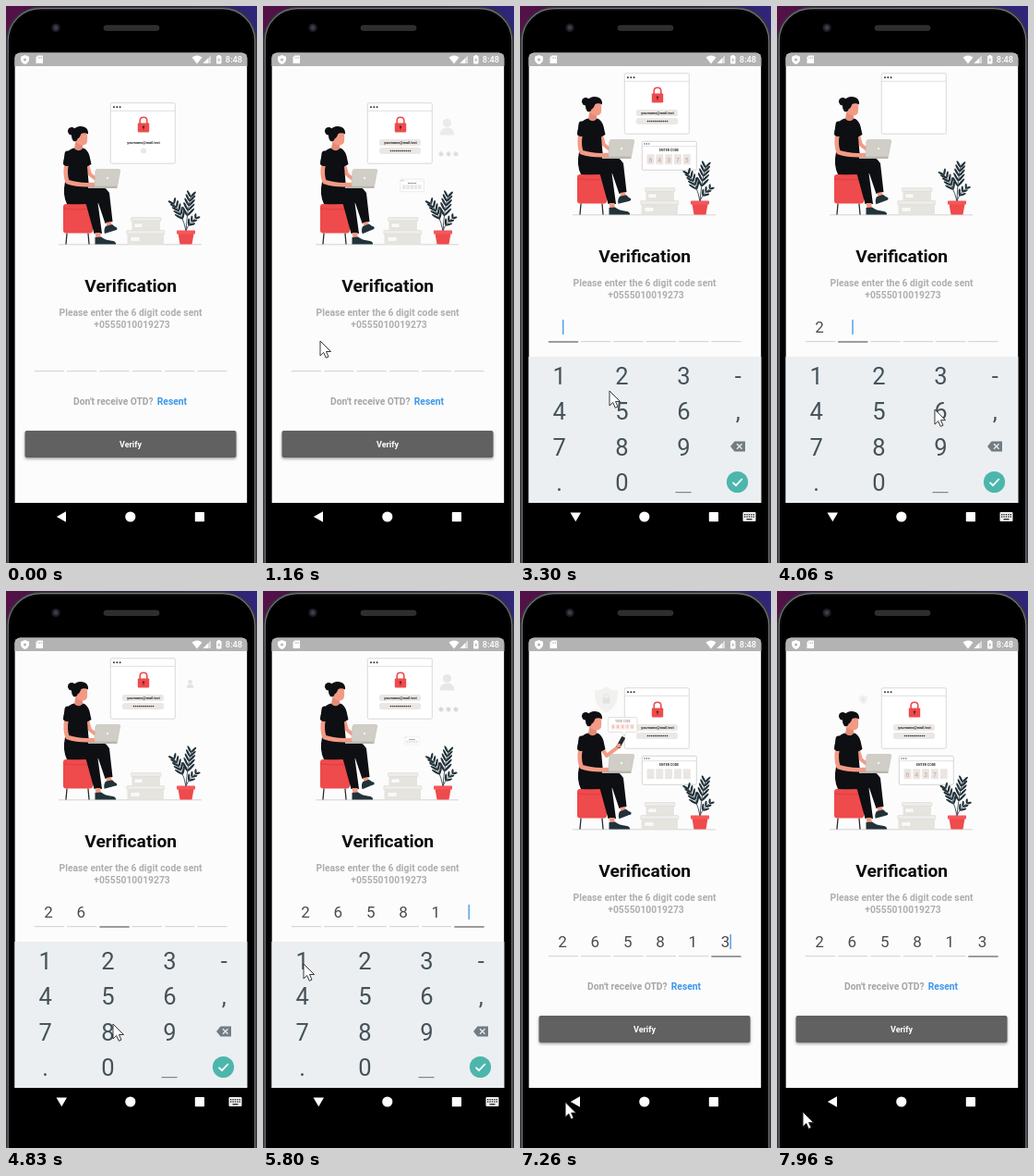
An HTML page with a canvas for the animation above (8000 ms loop, 272 by 602 pixels).

```html
<!DOCTYPE html>
<html lang="en">
<head>
<meta charset="utf-8">
<title>Verification screen</title>
<style>
html, body { margin: 0; width: 100%; height: 100%; overflow: hidden; background: #000; }
canvas { display: block; width: 272px; height: 602px; }
</style>
</head>
<body>
<canvas id="stage"></canvas>
<script>
const W = 272, H = 602, LOOP = 8000, STORY = 4720;
const SCREEN = [9.4, 50.4, 252, 486.6];
const canvas = document.getElementById('stage');
const c = canvas.getContext('2d');
const dpr = window.devicePixelRatio || 1;
canvas.width = W * dpr;
canvas.height = H * dpr;

const RED = '#ef4a4c', SKIN = '#f39a85', INK = '#0d0f12', LEAF = '#22323a';
const clamp = v => Math.max(0, Math.min(1, v));
const ramp = (t, a, b) => clamp((t - a) / (b - a));
const ease = v => v * v * (3 - 2 * v);
const back = v => 1 + 2.2 * (v - 1) ** 3 + 1.2 * (v - 1) ** 2;
const pop = (t, a, b) => t <= a ? 0 : t >= b ? 1 : Math.max(0, back(ramp(t, a, b)));

// Typed digits and the moment each lands in its field
const CODE = '265813';
const TYPED = [3600, 4250, 5050, 5400, 5800, 6200];

// Pointer tip: time, x, y
const POINTER = [
  [640, -14, 400], [1160, 62, 362], [1500, 46, 384], [1750, 44, 385], [2200, -14, 481],
  [2735, -14, 450], [3000, 62, 432], [3300, 97, 416], [3550, 109, 402], [3700, 109, 402],
  [4150, 178, 440], [4350, 176, 442], [4830, 116, 468], [5020, 112, 442], [5150, 112, 443],
  [5350, 112, 476], [5460, 110, 476], [5750, 44, 403], [5860, 44, 403], [6150, 177, 402],
  [6260, 177, 403], [6620, 58, 548], [6760, 55, 549], [7150, 52, 551], [7650, 29, 563], [8000, 28, 563]
];

function box(x, y, w, h, r, fill, stroke, lw = 0.6) {
  c.beginPath();
  c.roundRect(x, y, w, h, r);
  if (fill) { c.fillStyle = fill; c.fill(); }
  if (stroke) { c.strokeStyle = stroke; c.lineWidth = lw; c.stroke(); }
}
function dot(x, y, r, fill) {
  c.beginPath();
  c.arc(x, y, r, 0, 7);
  c.fillStyle = fill;
  c.fill();
}
function shape(d, fill, stroke, lw = 1) {
  const p = new Path2D(d);
  if (fill) { c.fillStyle = fill; c.fill(p); }
  if (stroke) { c.strokeStyle = stroke; c.lineWidth = lw; c.stroke(p); }
}
function label(s, x, y, size, color, weight = 400, align = 'center') {
  c.font = `${weight} ${size}px Roboto, sans-serif`;
  c.textAlign = align;
  c.fillStyle = color;
  c.fillText(s, x, y);
}
function scaled(x, y, k, alpha, draw) {
  if (k <= 0.01 || alpha <= 0.01) return;
  c.save();
  c.globalAlpha *= alpha;
  c.translate(x, y);
  c.scale(k, k);
  c.translate(-x, -y);
  draw();
  c.restore();
}

function storyTime(t) {
  if (t < 100) return 0;
  if (t < 630) return 200;
  if (t >= 2260 && t < 2730) return 2260;
  return t % STORY;
}

function body() {
  const bg = c.createLinearGradient(0, 0, W, 0);
  bg.addColorStop(0, '#551148');
  bg.addColorStop(0.5, '#24164a');
  bg.addColorStop(1, '#30267a');
  c.fillStyle = bg;
  c.fillRect(0, 0, W, H);
  box(0.3, 1, 271.4, 660, 37, '#2c2d30', '#3a3b3e', 0.8);
  box(2.2, 2.6, 267.6, 660, 35, '#0a0a0b', '#77797d', 1.2);
  box(4.6, 5, 262.8, 660, 32, '#000');
  dot(54, 23.5, 4.6, '#1e1e24');
  dot(54, 23.5, 2.4, '#3b3d4a');
  box(106, 21, 60, 5.5, 2.7, '#2e2e31', '#3d3d40', 0.6);
}

function statusBar() {
  c.fillStyle = '#b3b3b3';
  c.fillRect(9, 50, 253, 15);
  shape('M20.5 53 L25 54.7 V58 Q24.5 61.5 20.5 63 Q16.5 61.5 16 58 V54.7Z', '#fff');
  dot(20.5, 58, 1.5, '#b3b3b3');
  shape('M34.5 53.5 H40 V62 H32.5 V55.5Z', '#fff');
  shape('M35 55 V57 M36.8 55 V57 M38.5 55 V57', null, '#b3b3b3', 0.7);
  shape('M201.5 55.5 Q207 51.5 212.5 55.5 L207 62.5Z', '#fff');
  shape('M222 53.5 V62 H213.5Z', '#dedede');
  shape('M219 56.5 V62 H213.5Z', '#fff');
  box(228, 54, 5.5, 8.5, 0.8, '#fff');
  c.fillRect(229.5, 53, 2.5, 1.5);
  shape('M231.3 55.5 L229.3 58.8 H230.6 L230.2 61 L232.3 57.8 H231Z', '#b3b3b3');
  label('8:48', 247, 61.3, 9.3, '#fff', 500);
}

function lock() {
  shape('M145.2 127.5 V123.8 Q145.2 120.3 149 120.3 Q152.8 120.3 152.8 123.8 V127.5', null, RED, 1.6);
  box(142.8, 126.6, 12.4, 9.8, 1, RED);
  dot(149, 130.6, 1.2, '#5c2024');
  c.fillRect(148.6, 131, 0.8, 2.8);
}

function browser(s) {
  box(113.3, 104.8, 70, 65.4, 1.5, '#fff', '#c9c9c9', 0.7);
  shape('M113.5 113.3 H183', null, '#c9c9c9', 0.6);
  for (let i = 0; i < 3; i++) dot(117 + i * 3.3, 109.3, 1, '#333');
  const leave = 1 - ease(ramp(s, 3850, 4050)), enter = pop(s, 4200, 4400);
  const k = s < 4100 ? leave : enter;
  scaled(149, 128, k, 1, lock);
  if (s > 4350 || s < 4000) {
    const fresh = s > 4350 || s < 20;
    if (!fresh) scaled(149, 147.5, 1, leave, () => box(126, 144, 45, 7, 2.5, '#ebe7e5'));
    scaled(149, 147.5, 1, s > 4350 ? ramp(s, 4350, 4550) : leave,
      () => label('yourname@mail.test', 149, 148.6, 3.8, '#222', 700));
  }
  const pass = s > 4700 ? 0.15 : s < 20 ? 0.18 : pop(s, 20, 100) * leave;
  scaled(149, 156.5, pass, 1, () => {
    if (pass < 0.3) return dot(149, 156.5, 17, '#ebe7e5');
    box(126, 153, 45, 7, 2.5, '#ebe7e5');
    for (let i = 0; i < 11; i++) dot(138.5 + i * 2.1, 156.5, 0.85, '#3a3a3a');
  });
}

function account(s) {
  const fade = 1 - 0.35 * ramp(s, 950, 1160) - 0.65 * ramp(s, 1160, 1320);
  const k = pop(s, 80, 300);
  scaled(199.5, 134, k, fade, () => {
    dot(199.5, 126.5, 4.6, '#e2e2e2');
    shape('M191.5 139.5 Q192 131.5 199.5 131.5 Q207 131.5 207.5 139.5Z', '#e2e2e2');
  });
  scaled(201, 160, pop(s, 250, 480), fade, () => {
    for (const x of [193, 201, 209])
      for (let i = 0; i < 3; i++) {
        const a = i * Math.PI / 3 + 0.5, u = 3 * Math.cos(a), v = 3 * Math.sin(a);
        shape(`M${x - u} ${160 - v} L${x + u} ${160 + v}`, null, '#cfcfcf', 1.3);
      }
  });
}

function codeCard(s) {
  const grow = 0.42 * pop(s, 1060, 1160) + 0.58 * pop(s, 1160, 1320);
  const k = grow * (1 - ease(ramp(s, 3750, 3950)));
  scaled(161.5, 194, k, 1, () => {
    box(132.3, 178.3, 59, 31, 1.5, '#fff', '#c4c4c4', 0.7);
    shape('M132.5 183.6 H191', null, '#c9c9c9', 0.5);
    for (let i = 0; i < 3; i++) dot(135 + i * 2.4, 181, 0.7, '#444');
    label('ENTER CODE', 161.5, 189.3, 3.6, '#333', 700);
    [...'64375'].forEach((d, i) => {
      const x = 137.5 + i * 9.8;
      box(x, 192.3, 8, 11, 0.8, '#e9e6e3');
      scaled(x + 4, 198, 1, ramp(s, 2980 + i * 65, 3030 + i * 65),
        () => label(d, x + 4, 200.5, 6.8, '#dba8a0', 500));
    });
  });
}

function shield(s) {
  const k = pop(s, 1720, 1920) * (1 - 0.62 * ramp(s, 3100, 3240) - 0.38 * ramp(s, 3240, 3295));
  const alpha = ramp(s, 1720, 1900) * (1 - 0.4 * ramp(s, 2080, 2260));
  scaled(93.5, 117.5, k, alpha, () => {
    shape('M93.5 103.5 Q99 107.5 106 107.5 Q107 125 93.5 131.5 Q80 125 81 107.5 Q88 107.5 93.5 103.5Z', '#ecebea');
    shape('M91 116 V113.8 Q91 111.5 93.5 111.5 Q96 111.5 96 113.8 V116', null, '#d6d6d4', 1);
    box(89.8, 115.5, 7.4, 6.2, 0.8, '#d9d9d7');
  });
}

function message(s) {
  const k = pop(s, 1580, 1760) * (1 - ease(ramp(s, 2720, 2880)));
  scaled(113, 156, k, 1, () => {
    shape('M97 136.5 H125.5 Q127 136.5 127 138 V151 Q127 152.5 125.5 152.5 H115 L112.5 156.5 L110.5 152.5 H97 Q95.5 152.5 95.5 151 V138 Q95.5 136.5 97 136.5Z', '#fff', '#cfcfcf', 0.6);
    label('YOUR CODE', 111.3, 141.6, 3, '#a08a88', 500);
    [...'64375'].forEach((d, i) => {
      box(98.8 + i * 5.1, 144, 4.4, 5.4, 0.5, '#fae3df');
      label(d, 101 + i * 5.1, 148.4, 4.4, '#eaa59f', 500);
    });
  });
}

function legs(s) {
  // Far leg: shin, ankle, shoe
  shape('M80 203 L99 209 L104 246 H95.5 L87 215Z', INK);
  shape('M96.500 245 H102.500 V251 H97.500Z', SKIN);
  shape('M96.500 250 L103 249.500 Q107 253 116 254 Q119.500 255 119 257.500 H96.500Z', LEAF);
  // Near leg crossed over, with a gentle foot swing
  shape('M64 190 L92 191 Q108 194 112 202 L115.500 233 L107.500 235 L100 213 Q82 215 66 214 Q61 204 64 190Z', INK);
  shape('M108.500 234 L114 233 L114.500 238 L109.500 239Z', SKIN);
  c.save();
  c.translate(111, 238);
  c.rotate(0.1 * Math.sin(s * 6 * Math.PI / STORY));
  shape('M-3 0 L4 -2 Q7 1 9 1.500 Q10.500 4 7 4.500 L-4 8 Q-5.500 4 -3 0Z', LEAF);
  c.restore();
}

function head() {
  shape('M75.5 146 H83 V154 Q79 158.5 74 154Z', '#e58a76');
  shape('M74 138 Q79 134 87 135.5 Q88.8 140 87.8 147.500 Q86 151 82 150.500 Q76 149 74 144Z', SKIN);
  shape('M73 146 Q68.5 139 73 133.5 Q78 128 85.5 131 Q89.500 133 89 138.500 Q85 136.500 81.500 138 Q79.500 143 77.500 143.500 Q77 147 73 146Z', INK);
  dot(71.2, 135.3, 4.2, INK);
}

function person(s) {
  const lift = ease(ramp(s, 1380, 1580)) * (1 - ease(ramp(s, 2800, 2980)));
  c.lineCap = c.lineJoin = 'round';
  // Stool
  shape('M66 246 L65 257 M89 246 L90 257', null, '#2a2a2c', 1.3);
  box(62, 214, 32, 31.5, 3, RED);
  shape('M62.5 219 Q78 221 94 219', null, '#d63a3e', 0.7);
  legs(s);
  // Far arm, holding the phone when raised
  const x = 96 + 11 * lift, y = 186 - 18 * lift;
  shape(`M87 168 L${91 + 3 * lift} ${182 - 4 * lift} L${x} ${y}`, null, SKIN, 4);
  scaled(x, y, 1, clamp(lift * 1.5), () => {
    c.save();
    c.translate(x + 2, y - 4);
    c.rotate(0.5);
    box(-2.2, -7, 4.4, 13, 1, '#26292c');
    c.restore();
    dot(x, y - 1, 2.3, SKIN);
  });
  // Shirt and far sleeve
  shape('M74 153.5 Q78.5 157.5 83.5 153.5 Q88.500 155 90.500 162 L92.500 171 L88 173.500 L90 196 Q77 200 65 196 Q66 181 65 173 L62 171 Q63 156 74 153.500Z', INK);
  head();
  // Laptop
  shape('M98.5 176.5 H122.5 Q124 176.5 123.7 178 L120.5 195 H95.5 L97 178Z', '#d0cec7', '#b9b7b0', 0.5);
  shape('M89 195 H120.5 V197 H89Z', '#b7b5ae');
  dot(110, 186, 1.2, '#f4f3ef');
  // Near arm reaching to the keys
  shape('M65.500 171 Q63.500 182 66.500 190 Q78 194 94 193', null, SKIN, 4.6);
  shape('M67 160 L65.800 169.500', null, INK, 7);
  c.lineCap = 'butt';
  c.lineJoin = 'miter';
}

function boxes() {
  const pale = '#e6e4df', edge = '#d6d4ce';
  box(136.5, 229, 30.5, 13.5, 0.5, pale);
  box(135.5, 228.5, 32.5, 4, 0.5, '#eeece8', edge, 0.5);
  box(131.5, 243, 39.5, 14.5, 0.5, pale);
  box(130.8, 242.5, 41, 4.2, 0.5, '#eeece8', edge, 0.5);
  box(139, 235, 9, 4.5, 0.3, '#faf9f7', edge, 0.4);
  box(135, 249.5, 10, 4.8, 0.3, '#faf9f7', edge, 0.4);
}

// Palm stem bowing to its tip, with long slim leaves in pairs
function frond(x, y, n, len) {
  const dx = x - 195, dy = y - 243, a = Math.atan2(dy, dx);
  shape(`M195 243 Q${195 + dx * 0.25} ${243 + dy * 0.6} ${x} ${y}`, null, LEAF, 0.8);
  for (let i = 0; i < n; i++) {
    const u = 0.38 + 0.57 * i / (n - 1), v = 1 - u;
    const px = 195 + 2 * u * v * dx * 0.25 + u * u * dx;
    const py = 243 + 2 * u * v * dy * 0.6 + u * u * dy;
    const half = len * (1.15 - 0.45 * u);
    for (const side of [-1, 1]) {
      const b = a + side * 0.62;
      c.beginPath();
      c.ellipse(px + half * Math.cos(b), py + half * Math.sin(b), half, 1.15, b, 0, 7);
      c.fillStyle = LEAF;
      c.fill();
    }
  }
}

function plant(s) {
  c.save();
  c.translate(195, 243);
  c.rotate(0.035 * Math.sin(s * 4 * Math.PI / STORY));
  c.translate(-195, -243);
  frond(200.5, 205, 5, 5.6);
  frond(181, 213, 5, 5);
  frond(206, 229, 3, 3.8);
  c.restore();
  shape('M186.5 246 H203.5 L201.5 257.5 H188.5Z', RED);
  box(185, 242.5, 20, 4, 0.6, '#f4575a');
}

function illustration(t) {
  const s = storyTime(t);
  shape('M57 257.8 H212', null, '#b5b5b5', 0.6);
  shield(s);
  browser(s);
  account(s);
  boxes();
  codeCard(s);
  plant(s);
  person(s);
  message(s);
}

function fields(t) {
  const count = TYPED.filter(x => t >= x).length;
  const focus = t < 2740 ? -1 : Math.min(count, 5);
  for (let i = 0; i < 6; i++) {
    const x = 30.8 + i * 35.3, mid = x + 15.3, active = i === focus;
    c.fillStyle = active ? '#858585' : '#cfcfcf';
    c.fillRect(x, 394.2, 32.3, active ? 1.6 : 1);
    if (i < count) label(CODE[i], mid, 385, 17, '#4b4b4b');
  }
  if (focus < 0) return;
  const since = t - (count ? TYPED[count - 1] : 3000);
  if (since < 0 || since % 1000 < 500) {
    c.fillStyle = '#4b9bea';
    c.fillRect(46 + focus * 35.3 + (count === 6 ? 5 : 0), 371, 1.4, 16);
  }
}

function page(t) {
  illustration(t);
  label('Verification', 135.2, 308.6, 19.2, '#0c0c0c', 700);
  label('Please enter the 6 digit code sent', 135, 335, 10.3, '#aeaeae', 700);
  label('+0555010019273', 136.5, 347.7, 10.3, '#aeaeae', 700);
  fields(t);
  label("Don't receive OTD?", 73, 430.5, 10.3, '#a5a5a5', 700, 'left');
  label('Resent', 163.8, 430.5, 10.3, '#3c97ea', 700, 'left');
  c.save();
  c.shadowColor = 'rgba(0,0,0,.38)';
  c.shadowBlur = 3 * dpr;
  c.shadowOffsetY = 1.5 * dpr;
  box(20.5, 459, 229, 29, 2, '#616161');
  c.restore();
  label('Verify', 135, 477, 9, '#fff', 700);
}

function keyboard(drop) {
  c.save();
  c.translate(0, drop);
  c.fillStyle = '#eceff1';
  c.fillRect(9, 379, 253, 158);
  ['123-', '456,', '789', '.0'].forEach((row, r) =>
    [...row].forEach((k, i) => label(k, [42.7, 110.3, 177.3, 236.2][i], 408.7 + r * 38.4, 25.5, '#45525a')));
  c.fillStyle = '#7b868c';
  c.fillRect(168.5, 525, 17, 1.2);
  shape('M228 476 L232.5 470.5 H244 V481.5 H232.5Z', '#727d83');
  shape('M235 473.3 L240.5 478.7 M240.5 473.3 L235 478.7', null, '#eceff1', 1.3);
  dot(235.5, 514.5, 11.6, '#4db6ac');
  shape('M230.5 514.8 L234 518.2 L240.8 511', null, '#fff', 1.8);
  c.restore();
}

function navBar(t) {
  const typing = t >= 2420 && t < 6650;
  const press = ramp(t, 6600, 6700) * (1 - ramp(t, 6850, 7050));
  if (press) scaled(60.5, 552, 1, press, () => box(26, 536.5, 69, 31.5, 15.7, '#2c2c2c'));
  shape(typing ? 'M54.5 547.5 H66 L60.3 557.3Z' : 'M54.8 552 L65 546.3 V557.7Z', '#fff');
  dot(134.8, 552, 5.6, '#fff');
  box(204.8, 547, 10.2, 10.2, 0.8, '#fff');
  if (!typing) return;
  box(241.5, 547, 14, 10, 1, '#f2f2f2');
  c.fillStyle = '#111';
  for (let r = 0; r < 2; r++)
    for (let i = 0; i < 5; i++) c.fillRect(243 + i * 2.4, 549 + r * 2.4, 1.3, 1.3);
  c.fillRect(245.5, 554.2, 6, 1.2);
}

function pointer(t) {
  if (t < POINTER[0][0]) return;
  const i = POINTER.findIndex(p => p[0] > t);
  const [ta, xa, ya] = POINTER[i - 1], [tb, xb, yb] = POINTER[i];
  const u = ease(ramp(t, ta, tb));
  c.save();
  c.translate(xa + (xb - xa) * u, ya + (yb - ya) * u);
  shape('M0 0 V16 L3.7 12.5 L6.3 18.3 L9 17.1 L6.5 11.5 H11.5Z', '#fff', '#222', 0.9);
  c.restore();
}

function draw() {
  const t = performance.now() % LOOP;
  c.setTransform(dpr, 0, 0, dpr, 0, 0);
  body();
  const open = ease(ramp(t, 2740, 2940)) * (1 - ease(ramp(t, 6890, 7090)));
  c.save();
  c.beginPath();
  c.roundRect(...SCREEN, [6, 6, 0, 0]);
  c.clip();
  c.fillStyle = '#fcfcfc';
  c.fillRect(...SCREEN);
  c.save();
  c.translate(0, -32 * open);
  page(t);
  c.restore();
  statusBar();
  if (open > 0) keyboard(158 * (1 - open));
  c.restore();
  navBar(t);
  pointer(t);
  requestAnimationFrame(draw);
}
draw();
</script>
</body>
</html>
```
